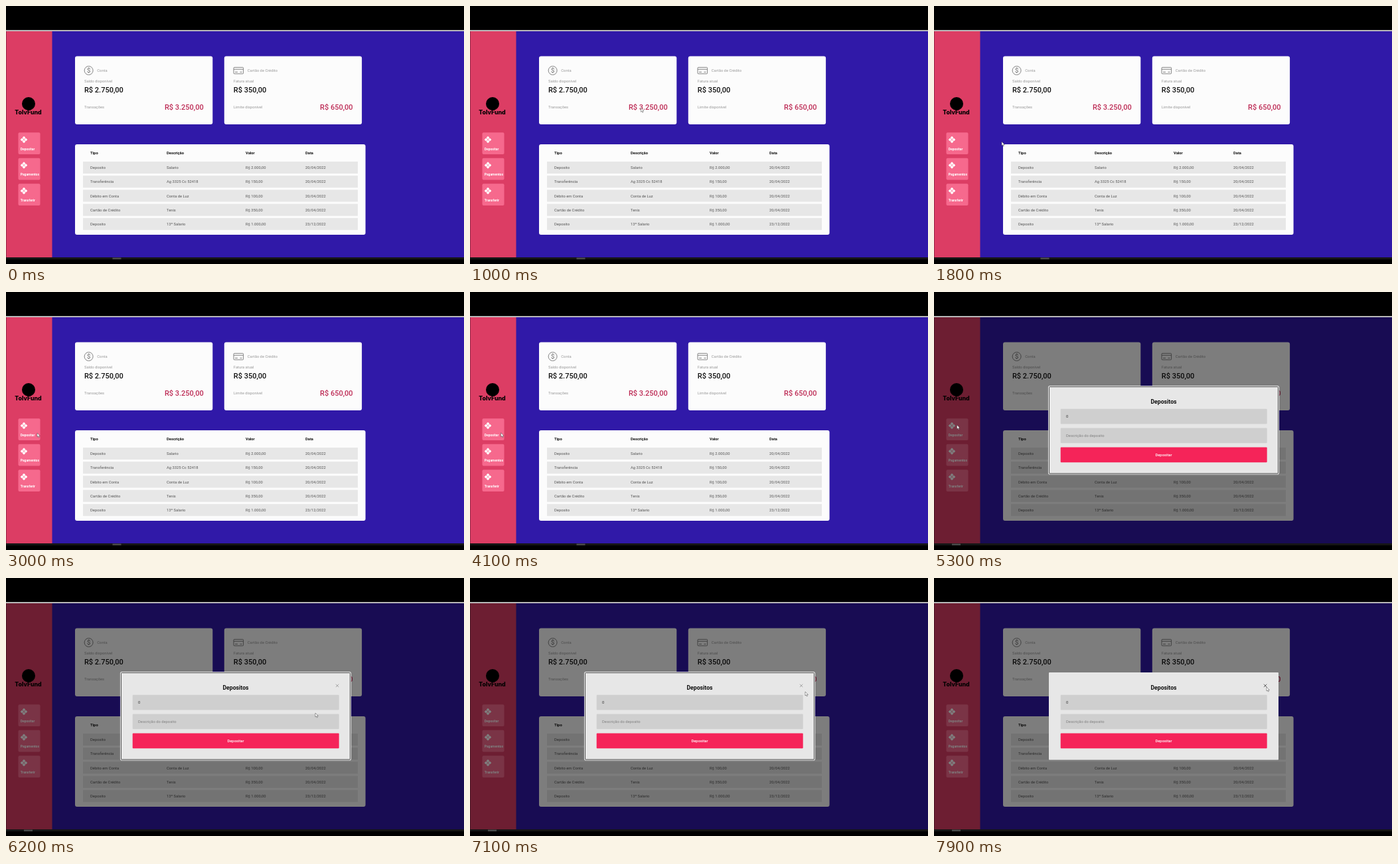
An HTML page for the animation above (8 s loop, 690 by 388 pixels).

```html
<!DOCTYPE html>
<html lang="pt">
<head>
<meta charset="utf-8">
<style>
html, body { margin: 0; width: 100%; height: 100%; overflow: hidden; background: #000; }
svg { display: block; width: 690px; height: 388px; font: 5.8px Roboto, Arial, sans-serif; }
.big { font-size: 11px; font-weight: 500; }
.menu { font-size: 5px; font-weight: 700; }
</style>
</head>
<body>
<svg id="stage" viewBox="0 0 690 388">
  <rect width="690" height="388"/>
  <rect y="378" width="690" height="3" fill="#151515"/>
  <rect id="tab" y="378.5" width="13" height="2.5" fill="#4a4a4a"/>
  <rect y="38" width="690" height="340" fill="#3019a8"/>
  <rect y="38" width="69.5" height="340" fill="#dc3d64"/>
  <rect y="38" width=".7" height="340" fill="#7c2440"/>
  <rect y="36.3" width="690" height="1.5" fill="#f4f4f4"/>
  <g id="page"></g>
  <g id="modal">
    <rect y="38" width="690" height="340" opacity=".5"/>
    <rect x="173" y="142" width="346" height="131.5" rx="1" fill="#e7e7e7"/>
    <g id="ring" fill="none">
      <rect x="172.6" y="141.6" width="346.8" height="132.3" rx="1" stroke="#fff"/>
      <rect x="173.5" y="142.5" width="345" height="130.5" rx="1" stroke="#222" stroke-width=".8"/>
    </g>
    <g id="form"></g>
    <path id="close" d="M496.9 159.7l4.4 4.4m0-4.4l-4.4 4.4" stroke-width=".7"/>
  </g>
  <path id="cursor" d="M0 0V6L1.4 4.8 2.4 7 3.4 6.5 2.5 4.4H4.4Z" fill="#fff" stroke="#333" stroke-width=".45"/>
</svg>
<script>
const $ = id => document.getElementById(id);
const text = (x, y, s, fill, extra = '') => `<text x="${x}" y="${y}" fill="${fill}" ${extra}>${s}</text>`;
const rect = (x, y, w, h, fill, r = 0) =>
  `<rect x="${x}" y="${y}" width="${w}" height="${h}" rx="${r}" fill="${fill}"/>`;
const BIG = 'class="big"', END = 'class="big" text-anchor="end"', MID = 'text-anchor="middle"';

function card(x, title, titleX, label, amount, note, total) {
  return rect(x, 75.5, 207.3, 102.5, '#fcfcfc', 3) +
    text(x + titleX, 99, title, '#999') + text(x + 14, 114.8, label, '#999') +
    text(x + 14, 130.3, amount, '#111', BIG) + text(x + 14, 153.6, note, '#999') +
    text(x + 193.8, 155.6, total, '#bd2b55', END);
}

function menuItem(label, i) {
  const y = 190.3 + 38.5 * i;
  const tiles = [[0, -2.8], [2.8, 0], [0, 2.8], [-2.8, 0]].map(([dx, dy]) =>
    `<rect x="-1.75" y="-1.75" width="3.5" height="3.5" rx=".6" transform="translate(${27 + dx} ${y + 10.7 + dy}) rotate(45)" fill="#fff"/>`);
  return rect(18.5, y, 33, 32.7, '#f6698d', 2) + tiles.join('') +
    text(21.7, y + 26.2, label, '#fff', 'class="menu"');
}

const columns = [127, 242, 361, 451];
const rows = [
  ['Deposito', 'Salario', 'R$ 2.000,00', '20/04/2022'],
  ['Transferência', 'Ag 3325 Cc 52418', 'R$ 150,00', '20/04/2022'],
  ['Débito em Conta', 'Conta de Luz', 'R$ 100,00', '20/04/2022'],
  ['Cartão de Crédito', 'Tenis', 'R$ 350,00', '20/04/2022'],
  ['Deposito', '13º Salario', 'R$ 1.000,00', '23/12/2022']
];
const cells = (row, y, fill, extra) => row.map((s, i) => text(columns[i], y, s, fill, extra)).join('');

$('page').innerHTML =
  '<circle cx="34" cy="147" r="10"/>' +
  text(33.5, 163, 'TolvFund', '#000', MID + ' style="font:800 8.8px Inter,sans-serif"') +
  ['Depositar', 'Pagamentos', 'Transferir'].map(menuItem).join('') +
  card(104, 'Conta', 33.3, 'Saldo disponível', 'R$ 2.750,00', 'Transações', 'R$ 3.250,00') +
  card(328.8, 'Cartão de Crédito', 35, 'Fatura atual', 'R$ 350,00', 'Limite disponível', 'R$ 650,00') +
  `<g fill="none" stroke="#777" stroke-width=".9"><circle cx="124.6" cy="97" r="6.5"/>
   <rect x="343" y="92.3" width="14.6" height="9.6" rx="1"/><path d="M343 95.2h14.6M345 99.3h4m3.5 0h3"/></g>` +
  text(124.6, 100.4, '$', '#666', MID + ' style="font-size:9.5px"') +
  rect(104, 208, 437.6, 136, '#fcfcfc', 3) +
  cells(['Tipo', 'Descrição', 'Valor', 'Data'], 222.6, '#111', 'font-weight="700"') +
  rows.map((row, i) => rect(116, 234 + 21.2 * i, 414, 18, '#e7e7e7') +
    cells(row, 245.1 + 21.2 * i, '#555')).join('');

$('form').innerHTML =
  text(346, 167.6, 'Depositos', '#111', MID + ' style="font-size:8.7px;font-weight:700"') +
  rect(190.7, 175.8, 311, 22.7, '#cfcfcf', 1) + text(199, 189, '0', '#333') +
  rect(190.7, 204.6, 311, 22.7, '#cfcfcf', 1) + text(199, 217.8, 'Descrição do deposito', '#808080') +
  rect(190.7, 233.4, 311, 22.8, '#f52459', 1) + text(346, 246.6, 'Depositar', '#fff', MID + ' font-weight="500"');

// Pointer stops: time, x, y
const stops = [
  [500, 510, 62], [1300, 106, 208], [1800, 102, 204], [2300, 102, 204], [3000, 47, 212],
  [4000, 47, 212], [4900, 43, 210], [5000, 34, 199], [5200, 34.5, 200], [5800, 34.5, 200],
  [6100, 440, 186], [6200, 466, 203], [6300, 466, 203], [7100, 505, 171],
  [7200, 505, 171], [7500, 501, 164], [8000, 501, 164]
];

function pointer(t) {
  const i = Math.max(1, stops.findIndex(s => s[0] >= t));
  const [t0, x0, y0] = stops[i - 1], [t1, x1, y1] = stops[i];
  const k = (t - t0) / (t1 - t0);
  return [x0 + (x1 - x0) * k, y0 + (y1 - y0) * k];
}

const show = (id, on) => $(id).setAttribute('visibility', on ? 'inherit' : 'hidden');

function draw(now) {
  const t = Math.floor(now % 8000 / 100) * 100;
  show('modal', t >= 5300);
  show('ring', t < 7900);
  show('close', t >= 5600);
  $('close').setAttribute('stroke', t >= 7300 ? '#222' : '#888');
  show('tab', t < 5200 || t >= 5300);
  $('tab').setAttribute('x', t < 5300 ? 160.5 : 27);
  show('cursor', t >= 500);
  if (t >= 500) $('cursor').setAttribute('transform', `translate(${pointer(t)})`);
  requestAnimationFrame(draw);
}
requestAnimationFrame(draw);
</script>
</body>
</html>
```
